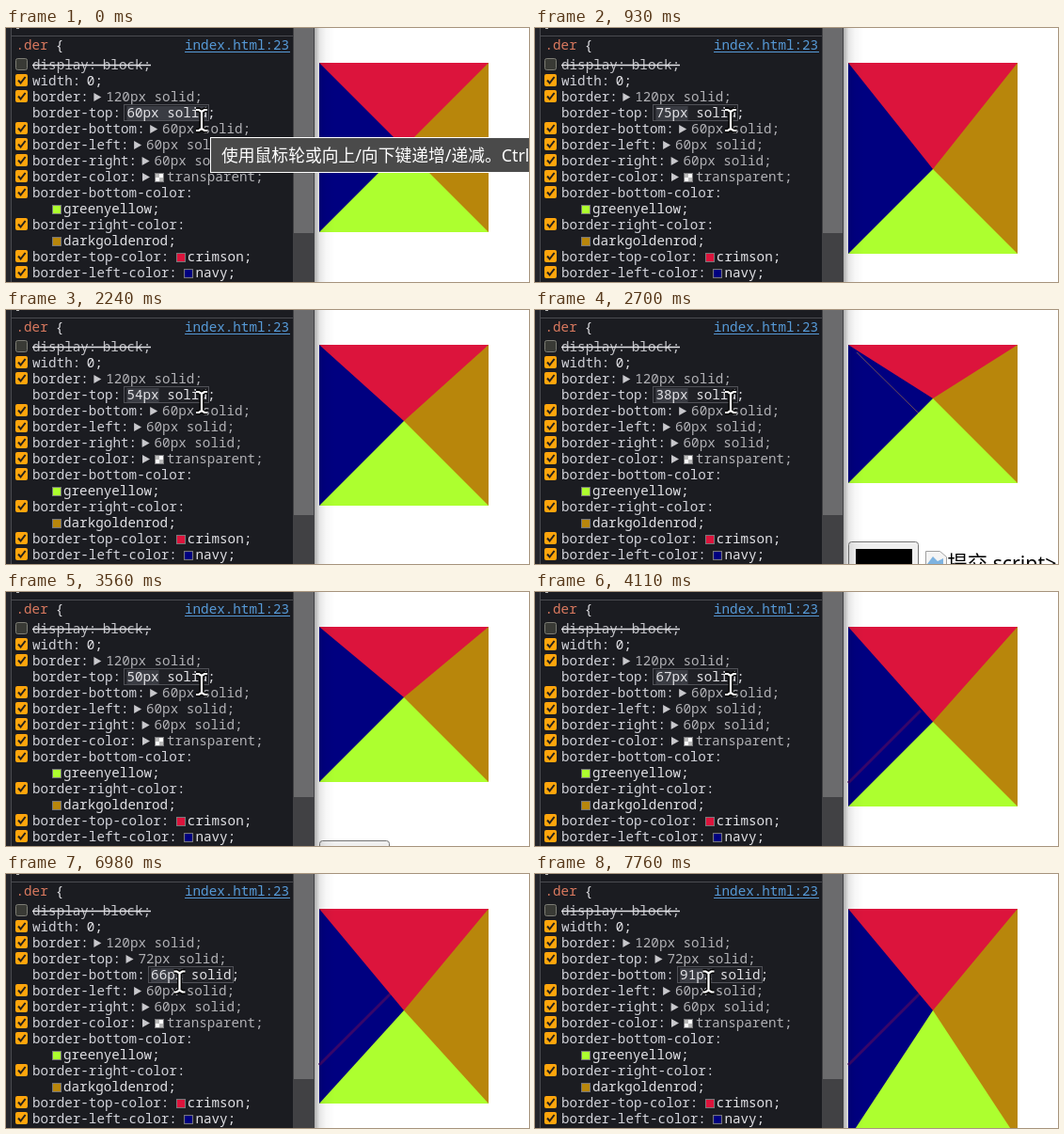
These frames come from a looping animation (556x270 px, 8 s). An HTML page:

```html
<!DOCTYPE html>
<html lang="zh">
<head>
<meta charset="utf-8">
<title>Border editing</title>
<style>
  html, body { margin: 0; width: 100%; height: 100%; overflow: hidden; background: #fff; }
  svg { display: block; }
  .mono { font: 14.25px "Noto Sans Mono", "DejaVu Sans Mono", monospace; white-space: pre; }
  .cjk { font-family: "Noto Sans", "Noto Sans CJK SC", "Noto Sans CJK", sans-serif; }
</style>
</head>
<body>
<svg width="556" height="270" viewBox="0 0 556 270">
  <defs>
    <linearGradient id="shade">
      <stop offset="0" stop-opacity=".32"/>
      <stop offset=".25" stop-opacity=".1"/>
      <stop offset=".55" stop-opacity=".03"/>
      <stop offset="1" stop-opacity="0"/>
    </linearGradient>
  </defs>
  <rect width="556" height="270" fill="#fff"/>

  <g id="below">
    <rect x="333.5" y=".5" width="74" height="60" rx="3" fill="#efefef" stroke="#767676"/>
    <rect x="341" y="8" width="60" height="45"/>
    <path d="M415.5 10.500h15l7 6v18h-22z" fill="#f4f4f4" stroke="#a0a0a0"/>
    <path d="M417 24l6-8 5 5 6-3v8h-17z" fill="#7eb3e0"/>
    <text class="cjk" x="438.500" y="31" font-size="21.300">提交 script&gt;</text>
  </g>

  <rect id="left" x="333" y="37" width="90" fill="#000080"/>
  <rect id="right" x="423" y="37" width="90" fill="#b8860b"/>
  <path id="trace1" d="M342 45L408 110" stroke="#6d4c58"/>
  <path id="trace2" d="M333 203L410 126" stroke="#37066a" stroke-width="3"/>
  <path id="top" fill="#dc143c"/>
  <path id="bottom" fill="#adff2f"/>
  <rect x="328" width="22" height="270" fill="url(#shade)"/>

  <rect width="328" height="270" fill="#1b1c21"/>
  <rect width="5" height="270" fill="#24252a"/>
  <path d="M5.500 0V270M6 8.500H305" stroke="#4a4b50"/>
  <rect x="305" width="23" height="270" fill="#414144"/>
  <rect x="306" width="21" height="218" fill="#6b6b6d"/>
  <g id="panel" class="mono"></g>
  <g id="edits" class="mono"></g>

  <g id="tip">
    <rect x="217.500" y="116.500" width="345" height="37" fill="#4a4a4a" stroke="#fff"/>
    <text class="cjk" x="229" y="142" font-size="17.800" fill="#fff">使用鼠标轮或向上/向下键递增/递减。Ctrl/</text>
  </g>

  <g id="cursor" fill="none">
    <path d="M-6-11H-3L0-9L3-11H6M0-9V9M-6 11H-3L0 9L3 11H6" stroke="#000" stroke-width="5"/>
    <path d="M-6-11H-3L0-9L3-11H6M0-9V9M-6 11H-3L0 9L3 11H6" stroke="#fff" stroke-width="2.200"/>
  </g>
</svg>
<script>
const $ = id => document.getElementById(id);
const LOOP = 8000, CH = 8.55, SCALE = 1.5;
const NAME = '#d2d3da', VALUE = '#e2e2e6', DIM = '#b1b1b5';

const text = (x, y, s, fill) => `<text x="${x}" y="${y + 4.5}" fill="${fill}">${s}</text>`;
const endOf = name => 28 + (name.length + 1) * CH;
const label = (y, name) => text(28, y, name + ':', NAME);
const arrow = (x, y) => `<path d="M${x - .5} ${y - 4}l8 4.500-8 4.500z" fill="#c8c8cc"/>`;

const check = y => `<rect x="10" y="${y - 7}" width="13" height="13" rx="2" fill="#ffa50c"/>
  <path d="M13 ${y - .5}l2.600 3 5-6.500" fill="none" stroke="#24211c" stroke-width="2"/>`;

const swatch = (x, y, color) => {
  const box = `<rect x="${x + .5}" y="${y - 3.5}" width="9" height="9" fill="${color || '#fff'}" stroke="#77777a"/>`;
  return color ? box : box + `<path d="M${x + 1} ${y - 3}h4v4h4v4h-4v-4h-4z" fill="#bbb"/>`;
};

const plain = (y, name, value) => check(y) + label(y, name) + text(endOf(name) + 6.4, y, value, VALUE);

const short = (y, name, value) =>
  check(y) + label(y, name) + arrow(endOf(name) + 6, y) + text(endOf(name) + 18.4, y, value + ';', DIM);

const colored = (y, name, color) =>
  check(y) + label(y, name) + swatch(Math.round(endOf(name) + 7.5), y, color) +
  text(endOf(name) + 19.5, y, color + ';', VALUE);

const wrapped = (y, name, color) =>
  check(y) + label(y, name) + swatch(49, y + 17, color) + text(61, y + 17, color + ';', VALUE);

// Open inline editor; `picked` is the number of selected characters
const editor = (y, name, value, picked) => {
  const x = endOf(name) + 6.4, left = Math.round(x) - 2.5;
  return label(y, name) +
    `<rect x="${left}" y="${y - 8.5}" width="90" height="17" fill="#202126" stroke="#505157"/>
     <rect x="${x}" y="${y - 7}" width="${picked * CH}" height="15" fill="#3a3c43"/>` +
    text(x, y, value, VALUE) + text(x + value.length * CH, y, ';', VALUE);
};

$('panel').innerHTML =
  '<path d="M11 .5h3" stroke="#bbb"/>' +
  text(10.5, 18, '.der', '#d9795f') + text(10 + 5 * CH, 18, '{', VALUE) +
  text(190, 18, 'index.html:23', '#5699d6') + '<path d="M190 25.500h112" stroke="#5699d6"/>' +
  '<rect x="10.500" y="32.500" width="12" height="12" rx="2" fill="#393a35" stroke="#7d7d75"/>' +
  text(28, 39, 'display:', '#c4c4c9') + text(102.8, 39, 'block;', '#c4c4c9') +
  '<path d="M28 39.500h126" stroke="#e2e2e6" stroke-width="1.500"/>' +
  plain(56, 'width', '0;') +
  short(73, 'border', '120px solid') +
  short(124, 'border-left', '60px solid') +
  short(141, 'border-right', '60px solid') +
  check(158) + label(158, 'border-color') + arrow(145.5, 158) + swatch(158, 158) +
  text(171, 158, 'transparent;', DIM) +
  wrapped(175, 'border-bottom-color', 'greenyellow') +
  wrapped(209, 'border-right-color', 'darkgoldenrod') +
  colored(243, 'border-top-color', 'crimson') +
  colored(260, 'border-left-color', 'navy');

// Wheel runs: first step, last step, step count, value before, value after
const topRuns = [
  [70, 70, 1, 60, 61], [530, 930, 6, 61, 75], [1000, 1080, 2, 75, 78], [1230, 1230, 1, 78, 79],
  [1550, 1770, 4, 79, 69], [1850, 2700, 12, 69, 38], [3250, 4110, 12, 38, 67], [4180, 4260, 2, 67, 72]
];
const bottomRuns = [[6380, 6380, 1, 60, 61], [6840, 7760, 13, 61, 91]];

function wheel(runs, t) {
  let value = 60;
  for (const [start, end, n, from, to] of runs) {
    if (t < start) break;
    const gap = (end - start) / (n - 1) || 1;
    const done = Math.min(n, Math.floor((t - start + 2) / gap) + 1);
    value = Math.round(from + (to - from) * done / n);
  }
  return value;
}

// Pointer glides: start, end, step count, from, to
const glides = [[4740, 4970, 4, [208, 98], [208, 104]], [5140, 5520, 6, [208, 104], [184.5, 114.5]]];

function pointer(t) {
  let pos = [208, 98];
  for (const [start, end, n, a, b] of glides) {
    if (t < start) break;
    const k = Math.min(n, Math.floor((t - start + 2) / (end - start) * (n - 1)) + 1) / n;
    pos = a.map((v, i) => v + (b[i] - v) * k);
  }
  return pos;
}

const show = (id, on) => $(id).setAttribute('visibility', on ? 'visible' : 'hidden');
let shown = '';

function draw(t) {
  const a = wheel(topRuns, t), b = wheel(bottomRuns, t);
  // Borders snap to whole pixels
  const mid = 37 + Math.round(a * SCALE), end = mid + Math.round(b * SCALE);
  $('left').setAttribute('height', end - 37);
  $('right').setAttribute('height', end - 37);
  $('top').setAttribute('d', `M333 37H513L423 ${mid}z`);
  $('bottom').setAttribute('d', `M333 ${end}H513L423 ${mid}z`);
  $('below').setAttribute('transform', `translate(0 ${end + 62})`);
  $('cursor').setAttribute('transform', `translate(${pointer(t)})`);
  show('tip', t < 70);
  show('trace1', t >= 2390 && t < 3250);
  show('trace2', t >= 3790);

  const first = t < 5370
    ? editor(90, 'border-top', a + 'px solid', t < 70 ? 10 : 4)
    : short(90, 'border-top', a + 'px solid');
  const second = t < 5440
    ? short(107, 'border-bottom', '60px solid')
    : editor(107, 'border-bottom', b + 'px solid', t < 6380 ? 10 : 4);
  if (first + second !== shown) $('edits').innerHTML = shown = first + second;
}

const origin = performance.now();
function tick() {
  draw((performance.now() - origin) % LOOP);
  requestAnimationFrame(tick);
}
tick();
</script>
</body>
</html>
```
